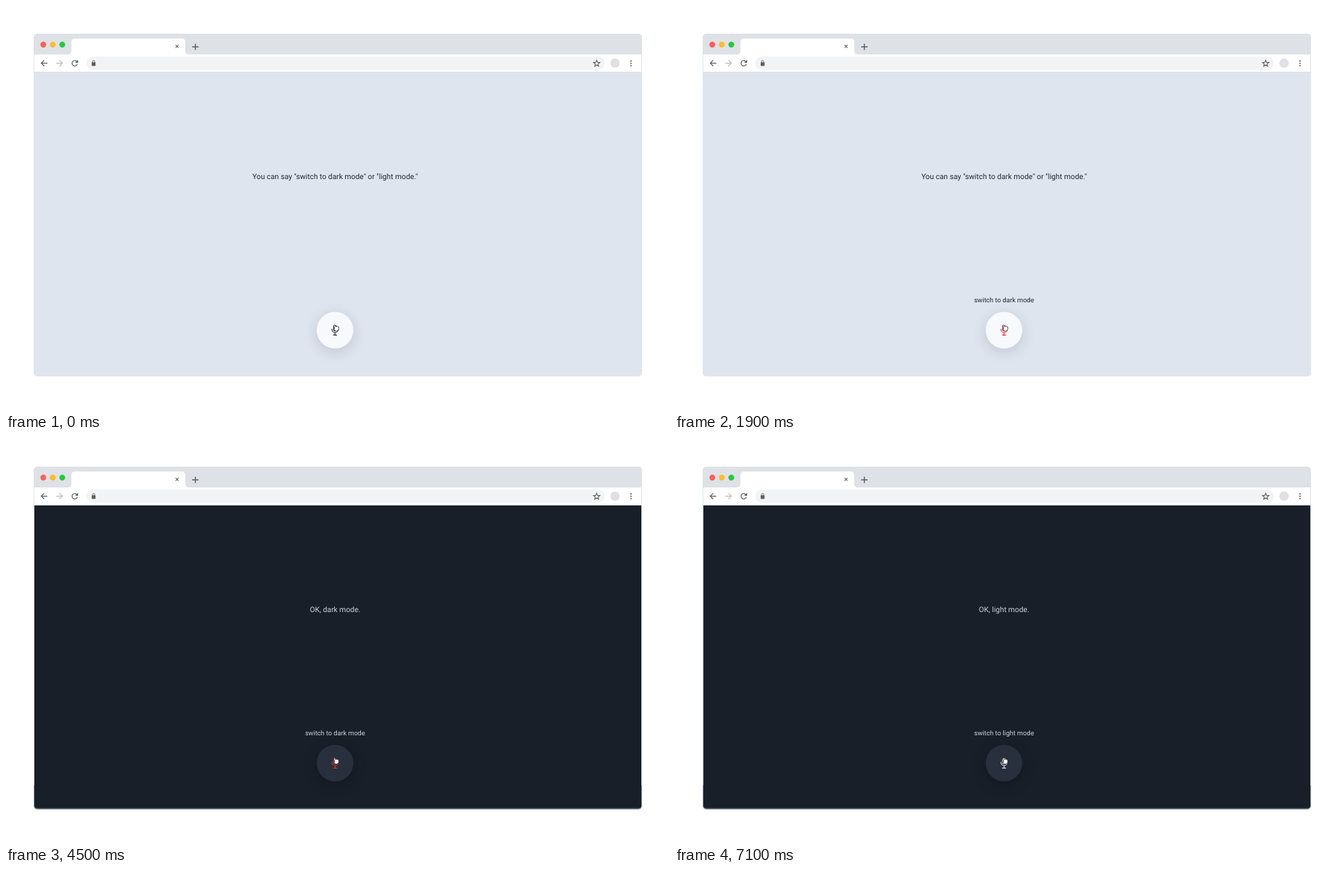
These frames come from a looping animation (958 px wide and 585 px high, 7800 ms). An HTML page with a canvas:

```html
<!DOCTYPE html>
<html lang="en">
<head>
<meta charset="utf-8">
<title>Voice theme switch</title>
<style>
html, body { margin: 0; width: 100%; height: 100%; overflow: hidden; background: #fff; }
canvas { display: block; width: 958px; height: 585px; }
</style>
</head>
<body>
<canvas id="stage"></canvas>
<script>
const W = 958, H = 585, LOOP = 7800, CX = 475.5;
const canvas = document.getElementById('stage');
const ctx = canvas.getContext('2d');
const dpr = window.devicePixelRatio || 1;
canvas.width = W * dpr;
canvas.height = H * dpr;

const THEMES = {
  light: { bg: '#dee5ee', text: '#202734', button: '#f7f9fd', icon: [38, 44, 57], shadow: 'rgba(20,30,50,0.15)' },
  dark: { bg: '#181f29', text: '#ccd3dc', button: '#282f3d', icon: [222, 228, 237], shadow: 'rgba(0,0,0,0.22)' }
};
const RED = [218, 52, 50];
const GREY = '#5a5e63';

// Each track lists [start time, value].
const themeTrack = [[0, 'light'], [4000, 'dark']];
const replyTrack = [
  [0, 'You can say "switch to dark mode" or "light mode."'],
  [2600, 'OK, dark mode.'],
  [7000, 'OK, light mode.']
];
const speechTrack = [
  [0, ''], [700, 'switch'], [1000, 'switched'], [1200, 'switch to'],
  [1400, 'switch to dark'], [1900, 'switch to dark mode'],
  [5200, 'switch'], [5400, 'switched'], [5500, 'switch to'],
  [6000, 'switch to light'], [6300, 'switch to light mode']
];
const listenTrack = [[0, 0], [500, 1], [2600, 0], [4400, 0.5], [4500, 1], [7000, 0.5], [7100, 0]];

function at(track, t) {
  let value = track[0][1];
  for (const [start, v] of track) if (t >= start) value = v;
  return value;
}

function mix(a, b, k) {
  return 'rgb(' + a.map((v, i) => Math.round(v + (b[i] - v) * k)).join(',') + ')';
}

function disc(x, y, r, fill) {
  ctx.fillStyle = fill;
  ctx.beginPath();
  ctx.arc(x, y, r, 0, Math.PI * 2);
  ctx.fill();
}

function box(x, y, w, h, r, fill) {
  ctx.fillStyle = fill;
  ctx.beginPath();
  ctx.roundRect(x, y, w, h, r);
  ctx.fill();
}

function draw(d, color, width) {
  ctx.strokeStyle = color;
  ctx.lineWidth = width;
  ctx.stroke(new Path2D(d));
}

function fillPath(d, color) {
  ctx.fillStyle = color;
  ctx.fill(new Path2D(d));
}

function label(text, y, size, color) {
  ctx.font = size + 'px Roboto, sans-serif';
  ctx.textAlign = 'center';
  ctx.textBaseline = 'alphabetic';
  ctx.fillStyle = color;
  ctx.fillText(text, CX, y);
}

function arrow(x, dir, color) {
  ctx.save();
  ctx.translate(x, 82.6);
  ctx.scale(dir, 1);
  draw('M4.6 0H-4M0 -4.2L-4.2 0L0 4.2', color, 1.3);
  ctx.restore();
}

function star(x, y, r) {
  ctx.beginPath();
  for (let i = 0; i < 10; i++) {
    const a = -Math.PI / 2 + i * Math.PI / 5;
    const q = i % 2 ? r * 0.43 : r;
    ctx.lineTo(x + q * Math.cos(a), y + q * Math.sin(a));
  }
  ctx.closePath();
  ctx.strokeStyle = GREY;
  ctx.lineWidth = 1.05;
  ctx.stroke();
}

function drawPage(dark, theme) {
  if (!dark) {
    box(40, 95, 879, 440, [0, 0, 5, 5], theme.bg);
    return;
  }
  box(40, 95, 879, 440, [0, 0, 5, 5], '#dee1e6');
  box(40.4, 500, 878.2, 35, [0, 0, 5, 5], '#69717b');
  box(41, 96, 877, 437.3, [0, 0, 4, 4], theme.bg);
}

function drawChrome() {
  box(40, 40, 879, 56, [5, 5, 0, 0], '#dee1e6');
  ctx.fillStyle = '#fff';
  ctx.fillRect(41, 70, 877, 25);
  fillPath('M89 70Q94.5 70 94.5 65V52Q94.5 47 99.5 47H254Q259 47 259 52V65Q259 70 264.5 70Z', '#fff');

  ['#fe5f58', '#fdbc2f', '#28c840'].forEach((c, i) => disc(53.9 + i * 13.7, 55.7, 4.2, c));
  draw('M245.1 56.1L249.3 60.3M249.3 56.1L245.1 60.3', GREY, 1.15);
  draw('M269 59H278.2M273.6 54.4V63.6', GREY, 1.45);

  arrow(55.2, 1, GREY);
  arrow(77.2, -1, '#b8bbbf');
  ctx.beginPath();
  ctx.arc(99.4, 82.7, 3.9, 0.35, Math.PI * 1.76);
  ctx.strokeStyle = GREY;
  ctx.lineWidth = 1.3;
  ctx.stroke();
  fillPath('M104.2 77.8V82.1H99.9Z', GREY);

  box(116, 73, 749, 19, 9.5, '#f1f3f4');
  box(123.8, 81.2, 5.6, 5.4, 0.7, GREY);
  draw('M125 81.5V80.3A1.6 1.6 0 0 1 128.2 80.3V81.5', GREY, 0.9);
  star(853.5, 83.1, 4.9);
  disc(880, 82.5, 6.8, '#dfe0e5');
  for (let i = -1; i < 2; i++) disc(903.1, 82.8 + i * 3.4, 1.05, GREY);
}

function drawButton(theme, listening) {
  ctx.save();
  ctx.shadowColor = theme.shadow;
  ctx.shadowBlur = 20 * dpr;
  ctx.shadowOffsetY = 5 * dpr;
  disc(475.4, 468.3, 26.5, theme.button);
  ctx.restore();

  const color = mix(theme.icon, RED, listening);
  draw('M473.3 463.8a2.2 2.2 0 0 1 4.4 0v3.4a2.2 2.2 0 0 1 -4.4 0z', color, 1.15);
  draw('M471 466.6v.6a4.5 4.5 0 0 0 9 0v-.6M475.5 471.8v3.5M472.7 475.3h5.6', color, 1.15);
}

function drawCursor() {
  const hand = 'M473.6 461.2Q474.6 460 475.4 461.3L476.4 463.3Q477.2 462.3 477.9 463Q478.8 462.2 479.4 463Q480.6 462.6 480.8 464L480.9 466.4L480 468.8L476.6 469.7Q475 468.2 473.2 467.3Q472.7 466.2 474.9 466.4Z';
  fillPath(hand, '#fff');
  draw(hand, '#15181e', 0.75);
}

function render(t) {
  const mode = at(themeTrack, t);
  const theme = THEMES[mode];
  ctx.setTransform(dpr, 0, 0, dpr, 0, 0);
  ctx.textRendering = 'geometricPrecision';
  ctx.lineCap = 'butt';
  ctx.lineJoin = 'miter';
  ctx.fillStyle = '#fff';
  ctx.fillRect(0, 0, W, H);
  drawPage(mode === 'dark', theme);
  drawChrome();
  label(at(replyTrack, t), 249.7, 10.8, theme.text);
  label(at(speechTrack, t), 428.4, 9.6, theme.text);
  drawButton(theme, at(listenTrack, t));
  drawCursor();
}

const begin = performance.now();
function tick() {
  render((performance.now() - begin) % LOOP);
  requestAnimationFrame(tick);
}
tick();
</script>
</body>
</html>
```
